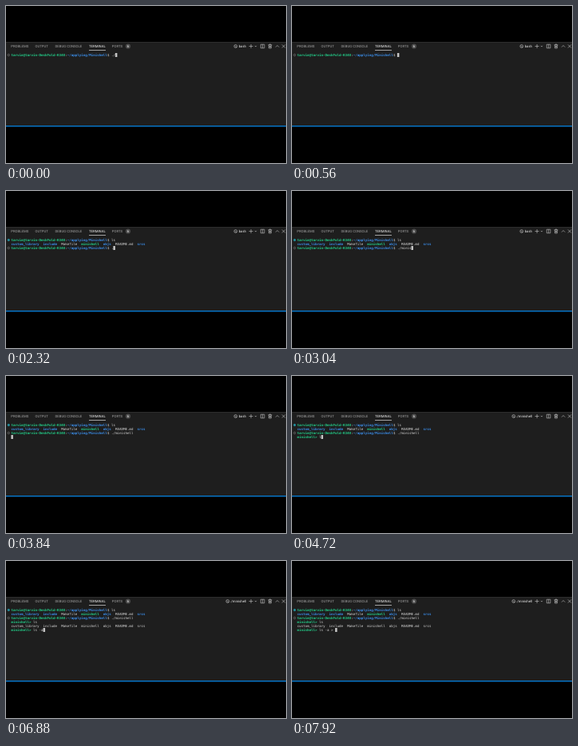
These frames come from a looping animation (351 px wide and 197 px high, 8000 ms). An HTML page:

```html
<!DOCTYPE html>
<html lang="en">
<head>
<meta charset="utf-8">
<title>Terminal session</title>
<style>
  html, body { margin: 0; width: 100%; height: 100%; overflow: hidden; background: #000; }
  svg { display: block; width: 100vw; height: 100vh; }
  text { white-space: pre; text-rendering: geometricPrecision; }
  .ui { font: 4.3px Roboto, Arial, sans-serif; fill: #a2a2a2; }
  .ui .on { fill: #f0f0f0; }
  .term { font: 4.17px "DejaVu Sans Mono", monospace; fill: #dcdcdc; }
  .term .green { fill: #23d18b; font-weight: bold; }
  .term .blue { fill: #3b8eea; font-weight: bold; }
  .icon { fill: none; stroke: #c8c8c8; stroke-width: .6; }
</style>
</head>
<body>
<svg viewBox="0 0 351 197">
  <rect width="351" height="197" fill="#000"/>
  <rect y="45" width="351" height="105.5" fill="#1e1e1e"/>
  <rect y="45" width="351" height=".6" fill="#383838"/>
  <rect y="150" width="351" height="1.5" fill="#0873c4"/>

  <g class="ui">
    <text x="6.2" y="52.1">PROBLEMS</text>
    <text x="36.5" y="52.1">OUTPUT</text>
    <text x="61.5" y="52.1">DEBUG CONSOLE</text>
    <text x="104" y="52.1" class="on">TERMINAL</text>
    <text x="132.8" y="52.1">PORTS</text>
    <rect x="104" y="55" width="21" height=".7" fill="#d8d8d8"/>
    <circle cx="153" cy="50.5" r="3.1" fill="#4d4d4d"/>
    <text x="153" y="52" class="on" text-anchor="middle">6</text>
    <text id="title" x="301" y="52.1" class="on" text-anchor="end"></text>
  </g>

  <g class="icon">
    <g id="shellIcon">
      <circle cx="0" cy="50.5" r="1.9"/>
      <path d="M-.9 49.6l.9.9-.9.9M.4 51.6h1.2"/>
    </g>
    <path d="M304.6 50.5h5M307.1 48v5"/>
    <path d="M311.8 49.9l1.2 1.2 1.2-1.2"/>
    <path d="M319.3 48.2h4.6v4.6h-4.6zM321.6 48.2v4.6"/>
    <path d="M328.7 48.8h4.6M330.2 48.8v-.8h1.6v.8M329.3 48.8l.3 4.2h2.8l.3-4.2M330.5 49.8v2.3M331.5 49.8v2.3"/>
    <path d="M338 51.6l2.1-2.1 2.1 2.1"/>
    <path d="M346 48.5l4 4M350 48.5l-4 4"/>
  </g>

  <g id="marks" fill="none" stroke-width=".6"></g>
  <g id="screen" class="term"></g>
  <rect id="cursor" width="2.5" height="5" fill="#c4c4c4"/>
</svg>

<script>
const LOOP = 8000, LEFT = 6.4, TOP = 59, COL = 2.51, ROW = 5;
const LS_DONE = 1760, RUN = 3760, PROMPT = 3920, TITLE = 4080, LS_AGAIN = 5200;

const $ = id => document.getElementById(id);

// Each step: time, text on the current input line
const keys = [
  [0, './'], [400, '.'], [560, ''], [1280, 'l'], [1520, 'ls'],
  [LS_DONE, ''], [2240, '.'], [2400, './'], [2640, './m'], [2720, './mi'],
  [2800, './min'], [2880, './mini'], [3040, './minis'], [3120, './minish'],
  [3200, './minishe'], [3360, './minishel'], [3440, './minishell'],
  [RUN, ''], [4640, 'l'], [4800, 'ls'],
  [LS_AGAIN, ''], [6000, 'l'], [6160, 'ls'], [6320, 'ls '], [6640, 'ls -'],
  [6800, 'ls -a'], [7040, 'ls -a '], [7440, 'ls -a >'], [7680, 'ls -a > ']
];

const bash = [
  ['tarvin@tarvin-DeskFold-K340', 'green'], [':', ''],
  ['~/applying/Minishell', 'blue'], ['$ ', '']
];
const mini = [['minishell>', 'green'], [' ', '']];
const files = [
  ['custom_library', 'blue'], ['include', 'blue'], ['Makefile', ''],
  ['minishell', 'green'], ['objs', 'blue'], ['README.md', ''], ['srcs', 'blue']
];
const listing = colored => files.map(([name, tone]) => [name + '  ', colored ? tone : '']);

function add(parent, tag, attrs, text = '') {
  const el = document.createElementNS('http://www.w3.org/2000/svg', tag);
  for (const name in attrs) el.setAttribute(name, attrs[name]);
  el.textContent = text;
  parent.append(el);
}

function linesAt(t, input) {
  const line = (prompt, text) => [...prompt, [text, '']];
  if (t < LS_DONE) return [line(bash, input)];
  const lines = [line(bash, 'ls'), listing(true)];
  if (t < RUN) return [...lines, line(bash, input)];
  lines.push(line(bash, './minishell'));
  if (t < PROMPT) return [...lines, []];
  if (t < LS_AGAIN) return [...lines, line(mini, input)];
  return [...lines, line(mini, 'ls'), listing(false), line(mini, input)];
}

function drawMarks(t) {
  $('marks').replaceChildren();
  const done = t >= LS_DONE;
  add($('marks'), 'circle', {
    cx: 3.3, cy: 61.5, r: 1.2,
    stroke: done ? '#2496a8' : '#858585', fill: done ? '#2496a8' : 'none'
  });
  if (done) add($('marks'), 'circle', { cx: 3.3, cy: 71.5, r: 1.2, stroke: '#858585' });
}

function draw(t) {
  const input = keys.findLast(([at]) => at <= t)[1];
  let col = 0, row = 0;
  $('screen').replaceChildren();
  linesAt(t, input).forEach((runs, i) => {
    row = i;
    col = 0;
    for (const [text, tone] of runs) {
      add($('screen'), 'text', { x: LEFT + col * COL, y: TOP + 4 + i * ROW, class: tone }, text);
      col += text.length;
    }
  });
  $('cursor').setAttribute('x', LEFT + col * COL);
  $('cursor').setAttribute('y', TOP + row * ROW);
  drawMarks(t);

  const running = t >= TITLE;
  $('title').textContent = running ? './minishell' : 'bash';
  $('shellIcon').setAttribute('transform', `translate(${running ? 277.8 : 287.8} 0)`);
}

const start = performance.now();
let last = '';
function tick() {
  const t = (performance.now() - start) % LOOP;
  const stage = [keys.findLastIndex(([at]) => at <= t), t >= PROMPT, t >= TITLE].join();
  if (stage !== last) draw(t);
  last = stage;
  requestAnimationFrame(tick);
}
tick();
</script>
</body>
</html>
```
